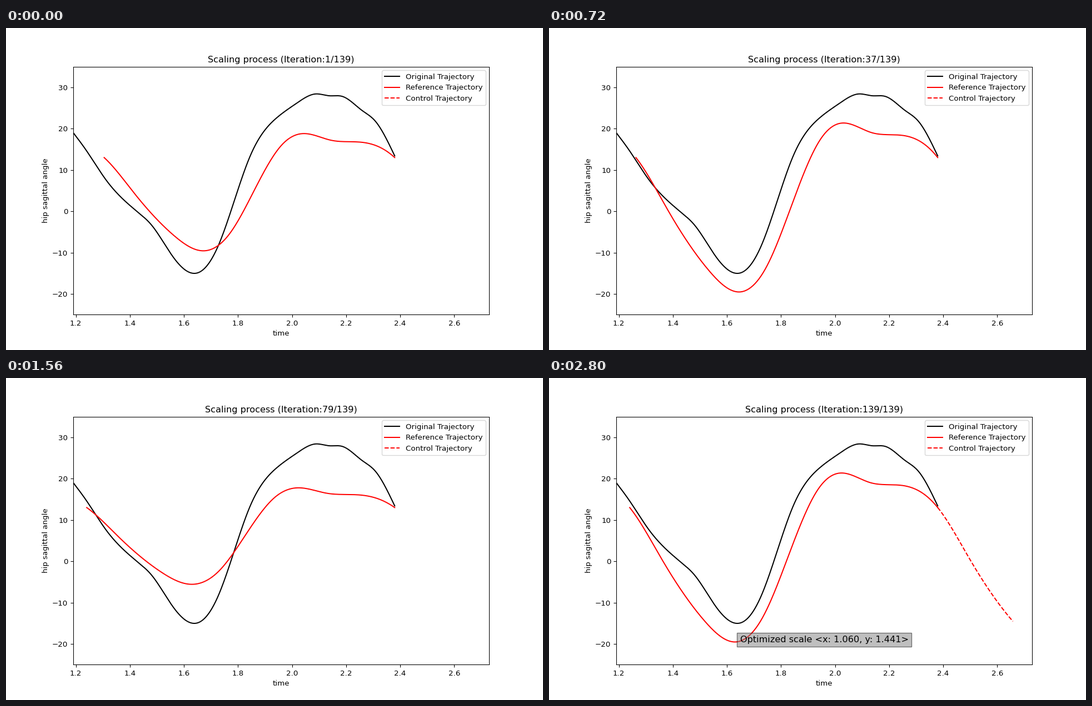
These frames come from a looping animation (966x580 px, 4 s). A matplotlib script:

```python
import numpy as np
import matplotlib.pyplot as plt
from matplotlib.animation import FuncAnimation

plt.rcParams["font.family"] = "DejaVu Sans"

T_START, T_END = 1.19, 2.38
PERIOD, END_ANGLE = 1.0752, 13.0
EVALUATIONS = 139
SEARCH_FRAMES, ALL_FRAMES = 70, 100

MEASURED = [
    (1.19, 19.05), (1.239, 14.7), (1.311, 7.65), (1.433, -0.4), (1.481, -3.4),
    (1.554, -10.5), (1.651, -14.9), (1.724, -8.8), (1.846, 13.5),
    (1.943, 22.6), (2.016, 26.1), (2.089, 28.4), (2.137, 27.95),
    (2.186, 27.8), (2.259, 24.4), (2.307, 21.9), (2.38, 13.4)]

# Key points of one gait cycle: phase, offset from the end angle
CYCLE = [
    (0, 0), (.105, -8.75), (.244, -19.1), (.339, -22.57), (.43, -18.6),
    (.53, -6.1), (.61, 2.95), (.685, 5.8), (.78, 4.2), (.885, 3.71),
    (.95, 2.45)]

# Alternating x and y line searches: bracketing, then closing in on the best
BEST = (1.06, 1.441)
SEARCH_STARTS = (2, 13, 27, 40, 49, 75)
GOLD = (5 ** .5 - 1) / 2
BRACKET = (0, 1, -1 - GOLD, 0, -GOLD, GOLD**2)
CLOSING = (-GOLD**12, 0, 0, 0, -GOLD**8)


def spline(points, at):
    """Natural cubic spline through (x, y) points."""
    x, y = np.array(points, float).T
    n, h = len(x), np.diff(x)
    slope = np.diff(y) / h
    system, rhs = np.eye(n), np.zeros(n)
    for i in range(1, n - 1):
        system[i, i - 1:i + 2] = h[i - 1], 2 * (h[i - 1] + h[i]), h[i]
        rhs[i] = 6 * (slope[i] - slope[i - 1])
    m = np.linalg.solve(system, rhs)
    k = np.clip(np.searchsorted(x, at) - 1, 0, n - 2)
    a, b = x[k + 1] - at, at - x[k]
    return ((m[k] * a**3 + m[k + 1] * b**3) / (6 * h[k])
            + (y[k] / h[k] - m[k] * h[k] / 6) * a
            + (y[k + 1] / h[k] - m[k + 1] * h[k] / 6) * b)


def scale_at(evaluation):
    """Scale (x, y) that the optimizer tries at this evaluation."""
    scale = [1, 1]
    for i, first in enumerate(SEARCH_STARTS):
        axis, probe = i % 2, evaluation - first
        if probe < 0:
            break
        if probe < len(BRACKET):
            scale[axis] += BRACKET[probe]
        else:
            late = probe - len(BRACKET)
            scale[axis] = BEST[axis] + (CLOSING[late] if late < len(CLOSING) else 0)
    return scale


phase = np.linspace(0, 1, 300)
repeated = [(p + turn, v) for turn in (-1, 0, 1) for p, v in CYCLE]
shape = spline(repeated, phase)

# 966 x 580 pixels
fig, ax = plt.subplots(figsize=(10, 6.0042), dpi=96.6)
fig.subplots_adjust(left=.125, right=.9, bottom=.11, top=.88)

time = np.linspace(T_START, T_END, 500)
ax.plot(time, spline(MEASURED, time), "k", label="Original Trajectory")
reference, = ax.plot([], [], "r", label="Reference Trajectory")
control, = ax.plot([], [], "r--", label="Control Trajectory")
ax.set(xlim=(1.19, 2.73), ylim=(-25, 35),
       xlabel="time", ylabel="hip sagittal angle")
title = ax.set_title("")
ax.legend(loc="upper right")
result = ax.text(.5, .1, "Optimized scale <x: %.3f, y: %.3f>" % BEST,
                 transform=ax.transAxes, fontsize=12, ha="center", va="center",
                 bbox=dict(facecolor="gray", alpha=.5))


def update(frame):
    done = frame >= SEARCH_FRAMES
    evaluation = min(2 * frame + 1, EVALUATIONS)
    sx, sy = scale_at(evaluation)
    angle = END_ANGLE + sy * shape
    reference.set_data(T_END - PERIOD * sx * (1 - phase), angle)
    ahead = phase < (.247 if done else 0)
    control.set_data(T_END + PERIOD * sx * phase[ahead], angle[ahead])
    title.set_text(f"Scaling process (Iteration:{evaluation}/{EVALUATIONS})")
    result.set_visible(done)
    return reference, control, title, result


anim = FuncAnimation(fig, update, frames=ALL_FRAMES, interval=40,
                     repeat=True, repeat_delay=0, blit=False)
plt.show()
```
